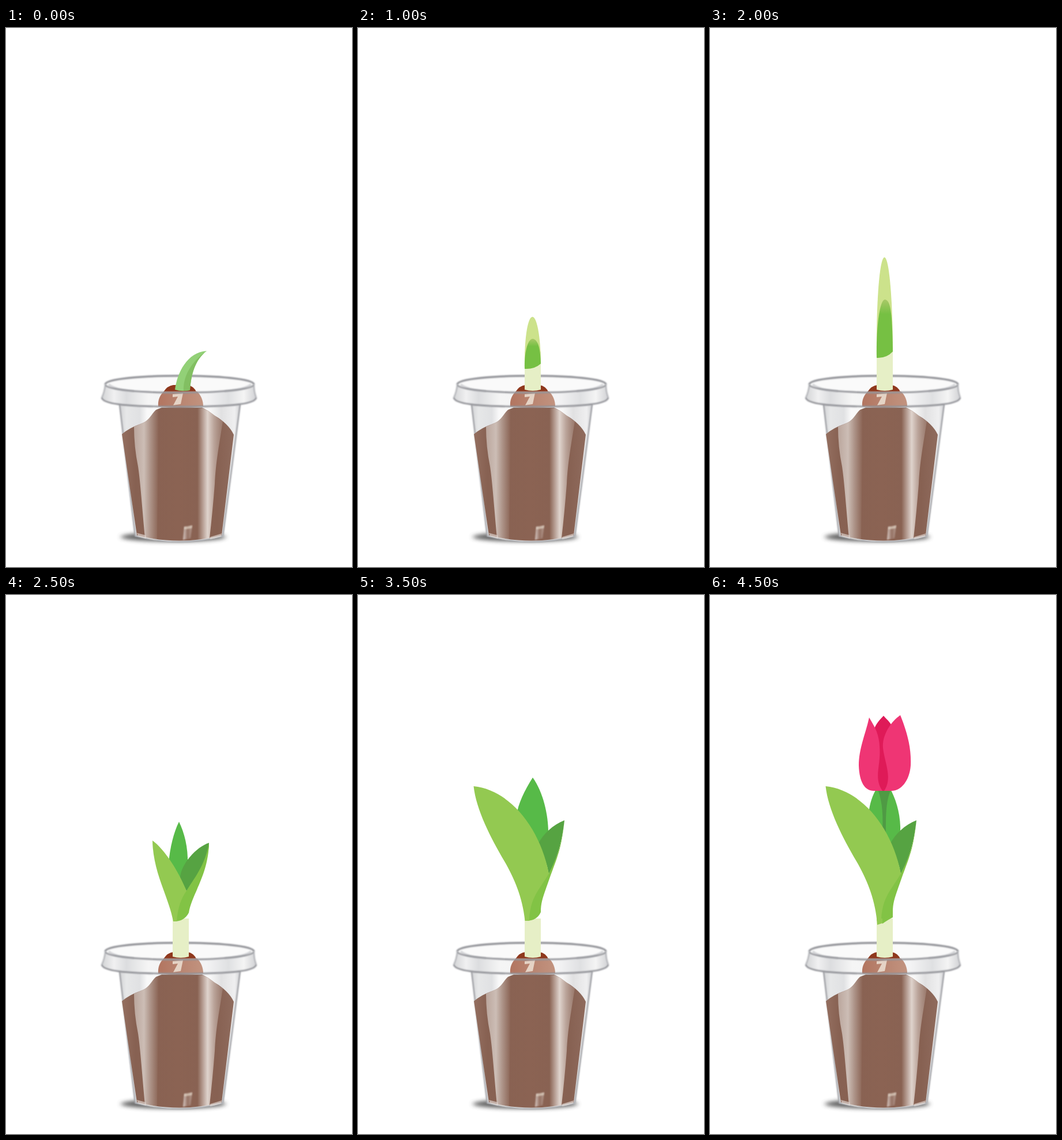
An HTML page for the animation above (5 s loop, 600x933 px).

```html
<!DOCTYPE html>
<html lang="en">
<head>
<meta charset="utf-8">
<title>Growing tulip</title>
<style>
html, body { margin: 0; width: 100%; height: 100%; overflow: hidden; background: #fff; }
svg { display: block; width: 100%; height: 100%; }
</style>
</head>
<body>
<svg viewBox="0 0 600 933">
  <defs>
    <filter id="soft" x="-20%" y="-150%" width="140%" height="400%"><feGaussianBlur stdDeviation="4.500 3.500"/></filter>
    <filter id="haze" x="-20%" y="-20%" width="140%" height="140%"><feGaussianBlur stdDeviation="1.2"/></filter>
    <filter id="edge" x="-5%" y="-20%" width="110%" height="140%"><feGaussianBlur stdDeviation=".8"/></filter>
    <linearGradient id="glass">
      <stop offset="0" stop-color="#d2d3d5"/><stop offset=".06" stop-color="#e6e7e8"/>
      <stop offset=".17" stop-color="#e0e1e3"/><stop offset=".23" stop-color="#f9f9f9"/>
      <stop offset=".75" stop-color="#f8f8f8"/><stop offset=".84" stop-color="#e1e1e2"/>
      <stop offset=".95" stop-color="#efeff0"/><stop offset="1" stop-color="#d0d1d4"/>
    </linearGradient>
    <linearGradient id="soil">
      <stop offset="0" stop-color="#946f60"/><stop offset=".12" stop-color="#876152"/>
      <stop offset=".5" stop-color="#8b6353"/><stop offset=".85" stop-color="#876152"/>
      <stop offset="1" stop-color="#8f6b5d"/>
    </linearGradient>
    <linearGradient id="shineL">
      <stop offset="0" stop-color="#ddd4ce" stop-opacity=".6"/>
      <stop offset=".4" stop-color="#ddd4ce" stop-opacity=".8"/>
      <stop offset=".65" stop-color="#ddd4ce" stop-opacity=".45"/>
      <stop offset="1" stop-color="#ddd4ce" stop-opacity="0"/>
    </linearGradient>
    <linearGradient id="shineR">
      <stop offset="0" stop-color="#eee7e2" stop-opacity="0"/>
      <stop offset=".4" stop-color="#eee7e2" stop-opacity=".85"/>
      <stop offset=".65" stop-color="#eee7e2" stop-opacity=".5"/>
      <stop offset="1" stop-color="#eee7e2" stop-opacity=".15"/>
    </linearGradient>
    <linearGradient id="rim">
      <stop offset="0" stop-color="#d3d4d6"/><stop offset=".08" stop-color="#f0f0f1"/>
      <stop offset=".16" stop-color="#dcdddf"/><stop offset=".3" stop-color="#f5f5f5"/>
      <stop offset=".68" stop-color="#f3f3f4"/><stop offset=".82" stop-color="#dfe0e2"/>
      <stop offset=".92" stop-color="#f4f4f4"/><stop offset="1" stop-color="#d0d1d4"/>
    </linearGradient>
    <linearGradient id="bulb">
      <stop offset="0" stop-color="#b27560"/><stop offset=".5" stop-color="#b98571"/>
      <stop offset="1" stop-color="#c2937f"/>
    </linearGradient>
    <linearGradient id="patch" x1="0" y1="0" x2="0" y2="1">
      <stop offset="0" stop-color="#a9c968"/><stop offset=".25" stop-color="#76c043"/>
    </linearGradient>
    <linearGradient id="glint">
      <stop offset="0" stop-color="#fff" stop-opacity=".65"/>
      <stop offset=".5" stop-color="#fff" stop-opacity=".1"/>
      <stop offset="1" stop-color="#fff" stop-opacity=".35"/>
    </linearGradient>
  </defs>

  <!-- cup behind the plant -->
  <ellipse cx="290" cy="881" rx="91" ry="8" fill="#444" opacity=".85" filter="url(#soft)"/>
  <path d="M196 650L224 880Q300 899 377 880L407 650Q300 668 196 650Z" fill="url(#glass)"/>
  <path d="M197 652L224 879Q300 899 376 879L406 652" fill="none" stroke="#a0a1a6" stroke-width="2.4" filter="url(#edge)"/>
  <path d="M201 703Q214 692 234 685C249 680 252 668 260 661L270 657H340Q349 661 362 671Q386 685 395 704L374 878Q301 897 227 878Z" fill="url(#soil)"/>
  <path d="M222 690L234 685C249 680 252 668 260 661L265 660L262 888Q250 886 241 882C236 830 233 785 229 759Q222 725 222 690Z" fill="url(#shineL)"/>
  <path d="M332 658H341Q349 661 362 671L376 681C368 730 363 760 362 789Q358 840 353 883L332 887Z" fill="url(#shineR)"/>
  <path d="M227 874L229 880L243 884L242 878ZM354 881L374 875L373 880Q362 884 354 885Z" fill="#e9e2dd" opacity=".6"/>
  <path d="M309 863L323 861L320 883L307 886Z" fill="url(#glint)" filter="url(#haze)"/>
  <path d="M309 864L323 861L322 866L309 868Z" fill="#eadfce" opacity=".6" filter="url(#edge)"/>

  <path d="M172 617C174 597 428 597 430 617C426 636 176 636 172 617Z" fill="#fafafa"/>
  <path d="M172 617C175 636 427 636 430 617Q430 629 434 640C432 650 400 655 300 655.500S168 650 166 640Q171 629 172 617Z" fill="url(#rim)"/>
  <path d="M172 617C174 597 428 597 430 617" fill="none" stroke="#929398" stroke-width="3.4" filter="url(#edge)"/>
  <path d="M178 617Q190 627 222 629M425 617Q414 626 379 629" fill="none" stroke="#d3d4d7" stroke-width="4" filter="url(#haze)"/>
  <path d="M273 630Q280 619 290 618H315Q326 620 330 630Z" fill="#8f381d"/>
  <path d="M264 655C263 644 267 635 274 629H331C338 635 342 645 342 655Q302 659 264 655Z" fill="url(#bulb)"/>
  <path d="M289 634L307 632L303 651L290 653L298 638L289 639Z" fill="#eadbce" opacity=".9"/>
  <g filter="url(#edge)" fill="none" stroke="#929398" stroke-width="2.8">
    <path d="M172 617C175 636 427 636 430 617"/>
    <path d="M166 640C168 650 200 655.500 300 655.500S432 650 434 640"/>
    <path d="M172 618Q171 629 166 640M430 618Q430 629 434 640" stroke="#b4b5b9" stroke-width="2.4"/>
  </g>

  <g id="plant"></g>
</svg>
<script>
const STEP = 500, STEPS = 10;
const PALE = '#e6efc6', TIP = '#cce28b', LEAF = '#93c951', WRAP = '#82c345',
      MID = '#57ba48', DARK = '#56a342', BACK = '#4f9a44', PINK = '#ef3574', ROSE = '#df1a58';

// Shoot: tip height, then the top and the left and right foot of its green patch.
function shoot(step, tip, top, left, right) {
  const side = tip + (left - tip) * .45;
  return [
    [step, step, TIP, `M289 ${left}C288 ${side} 294 ${tip} 302.5 ${tip}C311 ${tip} 317 ${side} 317 ${right}Q303 ${left} 289 ${left}Z`],
    [step, step, 'url(#patch)', `M289 ${left}C288 ${(top + left) / 2} 294 ${top - 2} 304 ${top}C312 ${top + 3} 316 ${top + 14} 317 ${right}Q306 ${left + 1} 289 ${left}Z`]
  ];
}

// Each part: first step, last step, fill, outline.
const parts = [
  [0, 0, '#92d077', 'M293 626C297 597 314 561 348 559C327 575 321 601 319 627Q305 630 293 626Z'],
  [0, 0, '#82bf62', 'M308 628C307 606 318 580 348 559C327 575 321 601 319 627Z'],
  [1, 9, PALE, 'M289 626V560H317V626Q303 630 289 626Z'],
  ...shoot(1, 531, 555, 597, 590),
  ...shoot(2, 500, 538, 590, 581),
  ...shoot(3, 458, 515, 582, 571),
  ...shoot(4, 397, 470, 571, 560),

  [5, 5, MID, 'M282 465C284 438 291 410 300 392.5C309 411 316 436 315 466L302 495Z'],
  [5, 5, DARK, 'M352 429C330 436 303 466 302 490L313 513C328 488 352 465 352 429Z'],
  [5, 5, WRAP, 'M352 429C351 485 322 518 317 550Q309 565 292 565L298 510L313 512C328 488 346 466 352 429Z'],
  [5, 5, LEAF, 'M254 425C276 441 300 480 313 512C304 525 298 540 296 565H290C282 522 255 481 254 425Z'],

  [6, 6, MID, 'M303 355C290 370 282 388 278 410L308 447L330 420C327 395 319 370 303 355Z'],
  [6, 6, DARK, 'M355 407C335 414 318 428 307 445L332 494C345 470 352 440 355 407Z'],
  [6, 6, WRAP, 'M355 407C354 450 347 472 333 509C323 534 318 541 318 551Q311 565 292 565L300 500L332 492C345 466 350 445 355 407Z'],
  [6, 6, LEAF, 'M234 376C267 389 315 430 332 493C317 513 300 533 296 565H290C282 520 262 490 251 464C240 438 236 410 234 376Z'],

  [7, 7, MID, 'M303 316C289 338 277 362 275 382L312 433L330 412C330 380 321 341 303 316Z'],
  [8, 8, BACK, 'M267 208C275 242 271 260 272 285C273 320 285 370 291 400L248 354C241 312 250 290 258 262Q266 240 267 208Z'],
  [8, 8, MID, 'M285 366H320C327 378 331 395 330 412L312 433L288 396Z'],
  [9, 9, MID, 'M287 338C279 353 276 367 275 380L312 433L330 412C331 385 325 360 314 338Z'],
  [8, 8, BACK, 'M290 366H316C305 383 304 400 306 424L299 412C299 398 297 386 290 366Z'],
  [9, 9, BACK, 'M291 336H314C304 359 305 385 305 424L299 412C300 385 300 362 291 336Z'],
  [7, 9, DARK, 'M358 390C338 398 321 413 312 432Q326 455 331 484C348 450 354 425 358 390Z'],
  [7, 9, WRAP, 'M358 390C353 440 345 455 332 491C322 520 317 530 317 549Q310 564 292 564L300 500L331 482C348 450 354 425 358 390Z'],
  [7, 9, LEAF, 'M200.500 331C261 337 315 400 331 482C315 510 298 523 297 564H289.500C285 520 268 485 254 461C230 420 205 372 200.500 331Z'],
  [9, 9, WRAP, 'M296 563L317 548V558Q309 562 299 569Z'],
  [9, 9, LEAF, 'M289 560H299V568L290 571Z'],

  [8, 8, PINK, 'M303 271C318 295 324 315 324 340C323 365 313 374 302 374C290 374 283 364 282 350C276 325 285 288 303 271Z'],
  [8, 8, ROSE, 'M303 271C285 287 278 310 279 332Q280 347 284 358C281 330 312 305 303 271Z'],
  [9, 9, ROSE, 'M301 209C291 219 285 227 283 238L290 339H313L320 236C315 222 308 217 301 209Z'],
  [9, 9, PINK, 'M276 212C284 226 293 238 294 262C297 295 283 316 299 339H284C269 339 259 325 258 295C258 265 270 240 276 212Z'],
  [9, 9, PINK, 'M330 208C345 245 349 270 348 295C346 322 331 339 315 339H302C317 317 303 291 300 265C298 246 311 221 330 208Z']
];

const plant = document.getElementById('plant');
const shapes = parts.map(([first, last, fill, d]) => {
  const path = document.createElementNS('http://www.w3.org/2000/svg', 'path');
  path.setAttribute('fill', fill);
  path.setAttribute('d', d);
  plant.append(path);
  return { path, first, last };
});

function draw() {
  const step = Math.floor(performance.now() / STEP) % STEPS;
  for (const { path, first, last } of shapes)
    path.style.display = step >= first && step <= last ? '' : 'none';
  requestAnimationFrame(draw);
}
draw();
</script>
</body>
</html>
```
